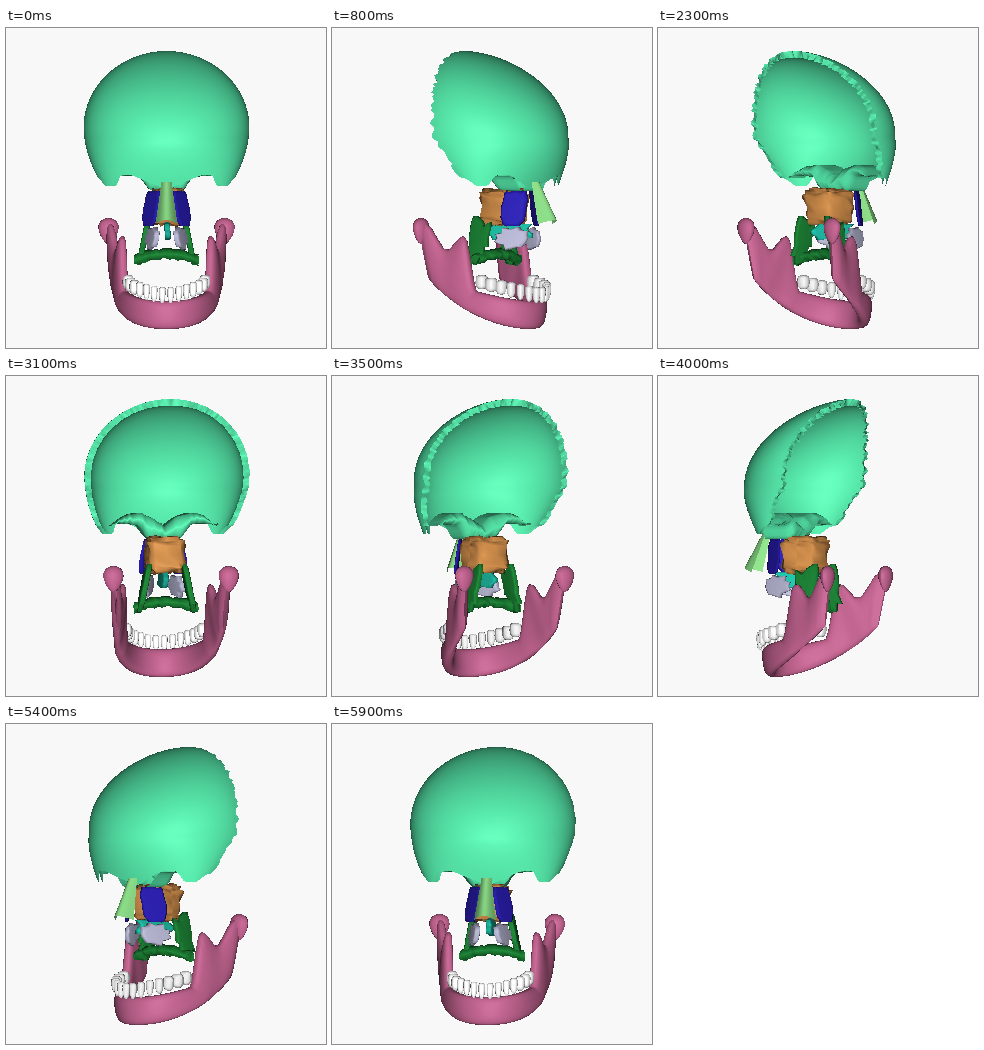
Animation of 320x320 px, one loop 6000 ms. Source, as an HTML page with a canvas:

```html
<!DOCTYPE html>
<html lang="en">
<head>
<meta charset="utf-8">
<title>Rotating skull bones</title>
<style>
  html, body { margin: 0; width: 100%; height: 100%; overflow: hidden; background: #f8f8f8; }
  canvas { display: block; width: 320px; height: 320px; }
</style>
</head>
<body>
<canvas id="stage" width="320" height="320"></canvas>
<script>
const SIZE = 320, STEPS = 60, STEP_MS = 100, BACK = 248;
const ctx = document.getElementById('stage').getContext('2d');
const image = ctx.createImageData(SIZE, SIZE);
const depth = new Float32Array(SIZE * SIZE);
const { sin, cos, abs, min, max, floor, ceil, hypot, exp, sqrt, PI } = Math;

const COLOR = {
  frontal: [92, 244, 180], jaw: [196, 102, 146], tooth: [254, 254, 254],
  ethmoid: [214, 146, 78], lacrimal: [44, 32, 178], nasal: [146, 230, 142],
  palatine: [32, 138, 58], concha: [196, 196, 226], vomer: [38, 214, 188]
};

const meshes = [];
const clamp = (v, a = 0, b = 1) => min(b, max(a, v));
const mix = (a, b, t) => a + (b - a) * t;
const signPow = (v, e) => Math.sign(v) * abs(v) ** e;
const ramp = (v, from, to) => (v = clamp((v - from) / (to - from))) * v * (3 - 2 * v);
const bell = (v, at, width) => exp(-(((v - at) / width) ** 2));
const rand = n => { const v = sin(n * 127.1 + 3.7) * 43758.5; return v - floor(v); };
const bothSides = fn => [-1, 1].forEach(fn);

// Surface over the unit square; x and z are relative to the spin axis.
function grid(color, nu, nv, fn) {
  const pts = [], row = nv + 1;
  for (let i = 0; i <= nu; i++)
    for (let j = 0; j <= nv; j++) pts.push(fn(i / nu, j / nv, i, j));
  const at = (i, j) => pts[clamp(i, 0, nu) * row + clamp(j, 0, nv)];
  const diff = (p, q) => p.map((v, k) => v - q[k]);
  const normals = pts.map((_, n) => {
    const i = floor(n / row), j = n % row;
    const a = diff(at(i + 1, j), at(i - 1, j)), b = diff(at(i, j + 1), at(i, j - 1));
    const c = [a[1] * b[2] - a[2] * b[1], a[2] * b[0] - a[0] * b[2], a[0] * b[1] - a[1] * b[0]];
    const len = hypot(...c) || 1;
    return c.map(v => v / len);
  });
  meshes.push({ color, nu, nv, pts, normals });
}

function blob(color, [cx, cy, cz], [rx, ry, rz], { power = 1, bump = 0, taper = 0, n = 14 } = {}) {
  grid(color, n, n, (u, v, i, j) => {
    const a = u * 2 * PI, b = clamp(v, .01, .99) * PI;
    const k = 1 + bump * (rand((i % n) * 17 + j) - .5);
    const ring = signPow(sin(b), power) * k * (1 - taper * (1 - cos(b)) / 2);
    return [cx + rx * ring * signPow(cos(a), power),
            cy - ry * k * signPow(cos(b), power),
            cz + rz * ring * signPow(sin(a), power)];
  });
}

// Thin upright plate with a ragged rim; lean tilts it, yaw turns it.
function plate(color, [cx, cy, cz], [ry, rz], { thick = 3, lean = 0, yaw = 0, rough = .2, power = .7, seed = 1 }) {
  const n = 20;
  grid(color, n, 5, (u, v, i, j) => {
    const k = [.01, .85, 1, 1, .85, .01][j], a = u * 2 * PI;
    const r = k * (1 - rough * rand(seed * 31 + i % n));
    const y = ry * r * signPow(sin(a), power), z = rz * r * signPow(cos(a), power);
    const side = (j < 3 ? thick : -thick) * (k === 1 ? .6 : 1);
    return [cx + lean * y + yaw * z + side, cy + y, cz + z];
  });
}

function buildFrontal() {
  const width = y => y < 100
    ? 83 * sqrt(max(0, 1 - ((100 - y) / 77) ** 2))
    : 83 - 17 * ((y - 100) / 55) ** 1.8;
  const front = y => y < 115
    ? -37 + 110 * max(0, 1 - ((115 - y) / 92) ** 2) ** .65
    : 73 - 17 * ((y - 115) / 40) ** 1.5;
  const edge = y => y < 110
    ? -6 - 31 * ((110 - y) / 87) ** 2.2
    : -6 + 27 * ((y - 110) / 45) ** .85;
  const bottom = a => 153 - 6 * ramp(a, .25, .55) + 8 * bell(a, 0, .2)
    + 11 * ramp(a, .68, .86) - 8 * ramp(a, .94, 1);
  const shell = (u, v, inner) => {
    const phi = (u - .5) * PI, a = sin(phi);
    const y = mix(23, bottom(abs(a)), 1 - cos(v * PI / 2));
    const rim = ramp(abs(u - .5), .48, .5);
    const jag = rim * 6 * (rand(floor(v * 70 + .5) + (inner ? 90 : 0)) - .5);
    const k = inner ? .925 : 1;
    return [width(y) * a * k, y + (inner ? 7 * (1 - v) : 0),
            mix(edge(y), front(y), k * max(0, cos(phi))) + jag];
  };
  grid(COLOR.frontal, 48, 70, (u, v) => shell(u, v, false));
  grid(COLOR.frontal, 48, 70, (u, v) => shell(u, v, true));
  bothSides(s => grid(COLOR.frontal, 1, 70, (u, v) => shell((s + 1) / 2, v, u > .5)));
  // orbital roofs, folded back under themselves
  grid(COLOR.frontal, 40, 16, (u, v, i) => {
    const s = u * 2 - 1, a = abs(s);
    const roof = 150 - 13 * sin(PI * a), foot = 163 - 15 * ramp(a, .25, .55);
    const back = 1 - abs(2 * v - 1);
    return [54 * s, mix(roof, foot, ramp(v, .35, .65)) + 3 * back * (rand(i) - .5),
            54 - 40 * back - 16 * s * s * (1 - back)];
  });
}

function buildJaw() {
  // cross-section column, q = 0 at the chin and 1 at the rear border
  const column = t => {
    const q = abs(t), side = Math.sign(t), arc = q * PI / 2;
    const low = { x: 53 * sin(arc), y: 301 - 50 * q ** 2.4, z: -38 + 88 * cos(arc) };
    const top = {
      x: 46 * sin(arc) + 12 * ramp(q, .82, 1),
      y: 273 - 20 * q * q - 52 * ramp(q, .7, .81) + 17 * bell(q, .885, .035) - 8 * ramp(q, .9, .96),
      z: low.z + 3 + 11 * ramp(q, 0, .75) - 24 * ramp(q, .8, 1)
    };
    low.x *= side;
    top.x *= side;
    return { low, top, thick: (6.5 - 1.5 * q * q) * (1 - .7 * ramp(q, .96, 1)) };
  };
  grid(COLOR.jaw, 96, 24, (u, v) => {
    const t = u * 2 - 1, { low, top, thick } = column(t);
    const p = column(max(-1, t - .05)), q = column(min(1, t + .05));
    const dx = q.low.x + q.top.x - p.low.x - p.top.x, dz = q.low.z + q.top.z - p.low.z - p.top.z;
    const len = hypot(dx, dz), a = v * 2 * PI;
    const h = (1 - signPow(cos(a), .8)) / 2, w = thick * signPow(sin(a), .7);
    return [mix(low.x, top.x, h) - dz / len * w, mix(low.y, top.y, h), mix(low.z, top.z, h) + dx / len * w];
  });
  bothSides(s => {
    blob(COLOR.jaw, [58 * s, 203, -44], [13, 13, 8], { taper: .5 });
    for (let i = 0; i < 7; i++) {
      const a = (i + .5) * 12.3 * PI / 180, molar = ramp(i, 2, 5);
      blob(COLOR.tooth, [39 * s * sin(a), 267 - 13 * (i / 6) ** 1.3, 11 + 52 * cos(a)],
        [4.4 + 1.6 * molar, 8 - molar, 4.4 + 1.8 * molar],
        { power: .65, bump: .1, taper: .5 - .35 * molar, n: 10 });
    }
  });
}

function buildMiddle() {
  blob(COLOR.ethmoid, [0, 179, 15], [21, 18, 22], { power: .45, bump: .25, taper: .15, n: 16 });
  plate(COLOR.vomer, [1, 203, 22], [12, 38], { lean: .05, rough: .4, power: 1, seed: 4 });
  bothSides(s => {
    plate(COLOR.lacrimal, [15 * s, 180, 43], [19, 11], { thick: 2, lean: .16 * s, yaw: -.65 * s, rough: .15, power: .5, seed: 2 });
    plate(COLOR.concha, [14 * s, 210, 40], [13, 20], { lean: .12 * s, yaw: -.3 * s, rough: .35, power: 1, seed: 3 });
    plate(COLOR.palatine, [22 * s, 210, 2], [27, 17], { lean: .2 * s, rough: .5, seed: 7 });
  });
  grid(COLOR.palatine, 18, 8, (u, v, i, j) => {
    const s = u * 2 - 1, a = v * 2 * PI, r = 4 + 2.5 * rand(i * 9 + j % 8);
    return [32 * s, 226 + 6 * s * s + r * cos(a), 9 - 5 * s * s + 1.6 * r * sin(a)];
  });
  grid(COLOR.nasal, 10, 10, (u, v) => {
    const s = u * 2 - 1;
    return [s * (5 + 6 * v), 154 + 38 * v + 4 * s * s * v, 62 + 23 * v - (5 + 9 * v) * s * s];
  });
}

// Depth-buffered triangle with interpolated facing.
function triangle(a, b, c, color) {
  const area = (b[0] - a[0]) * (c[1] - a[1]) - (b[1] - a[1]) * (c[0] - a[0]);
  if (abs(area) < 1e-6) return;
  const span = k => [max(0, ceil(min(a[k], b[k], c[k]) - .5)), min(SIZE - 1, floor(max(a[k], b[k], c[k]) - .5))];
  const [x0, x1] = span(0), [y0, y1] = span(1);
  for (let y = y0; y <= y1; y++) {
    for (let x = x0; x <= x1; x++) {
      const px = x + .5, py = y + .5;
      const p = ((b[0] - px) * (c[1] - py) - (b[1] - py) * (c[0] - px)) / area;
      const q = ((c[0] - px) * (a[1] - py) - (c[1] - py) * (a[0] - px)) / area;
      const r = 1 - p - q;
      if (p < 0 || q < 0 || r < 0) continue;
      const n = y * SIZE + x, z = a[2] * p + b[2] * q + c[2] * r;
      if (z <= depth[n]) continue;
      depth[n] = z;
      const face = min(1, abs(a[3] * p + b[3] * q + c[3] * r));
      const light = .2 + .8 * face ** .65, shine = 12 * face ** 24;
      for (let k = 0; k < 3; k++) image.data[n * 4 + k] = color[k] * light + shine;
    }
  }
}

function render(step) {
  const turn = step / STEPS * 2 * PI, c = cos(turn), s = sin(turn);
  image.data.fill(BACK);
  for (let n = 3; n < image.data.length; n += 4) image.data[n] = 255;
  depth.fill(-1e9);
  for (const { color, nu, nv, pts, normals } of meshes) {
    const view = pts.map(([x, y, z], i) => {
      const m = normals[i];
      return [160.5 + x * c + z * s, y, z * c - x * s, m[2] * c - m[0] * s];
    });
    for (let i = 0; i < nu; i++) {
      for (let j = 0; j < nv; j++) {
        const n = i * (nv + 1) + j, m = n + nv + 1;
        triangle(view[n], view[m], view[n + 1], color);
        triangle(view[m], view[m + 1], view[n + 1], color);
      }
    }
  }
  ctx.putImageData(image, 0, 0);
}

buildFrontal();
buildJaw();
buildMiddle();

const start = performance.now();
let shown = -1;
function tick() {
  const step = floor(max(0, performance.now() - start) / STEP_MS) % STEPS;
  if (step !== shown) render(shown = step);
  requestAnimationFrame(tick);
}
tick();
</script>
</body>
</html>
```
